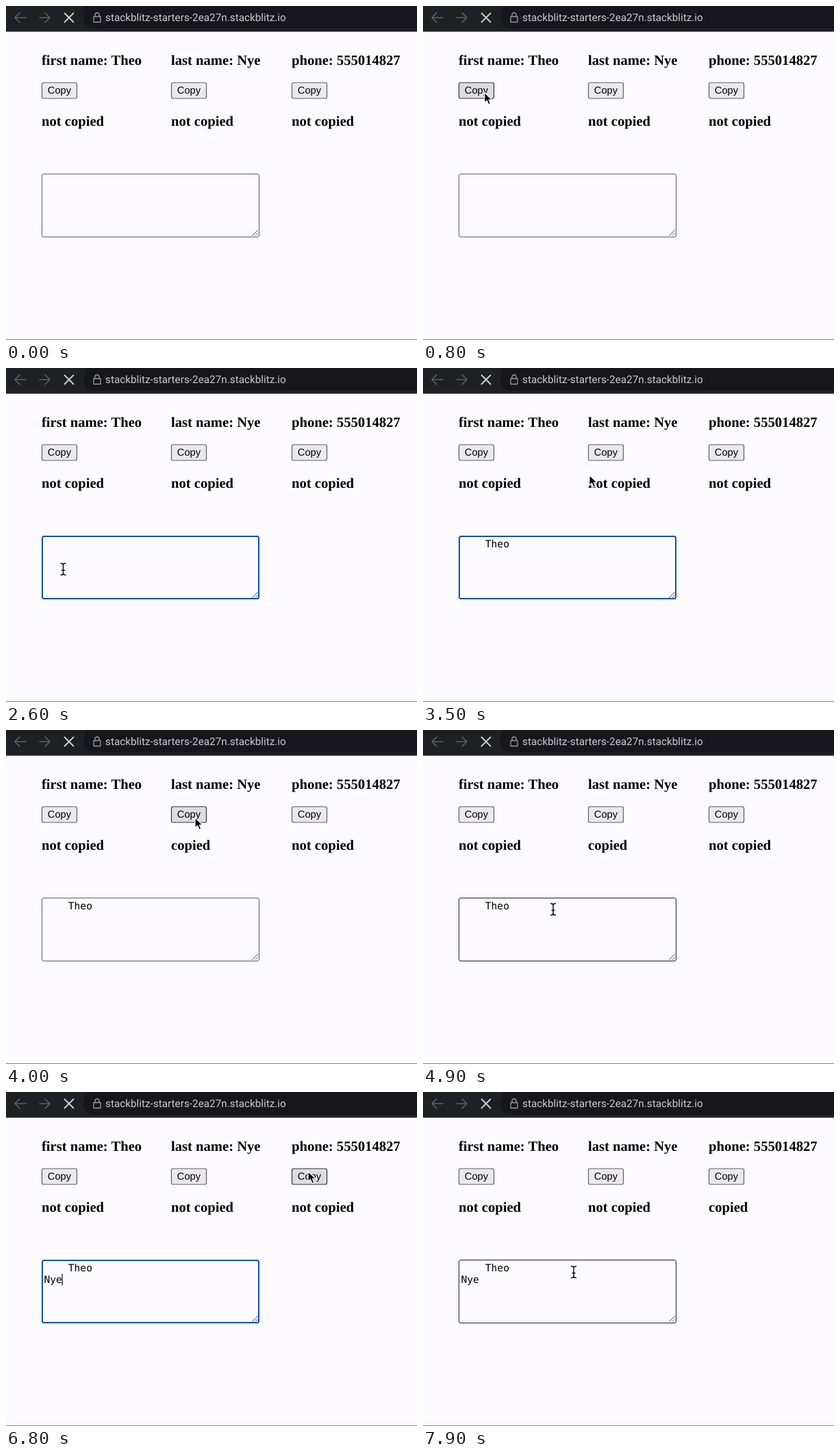
An HTML page for the animation above (8000 ms loop, 600 by 488 pixels).

```html
<!DOCTYPE html>
<html lang="en">
<head>
<meta charset="utf-8">
<title>Copy buttons</title>
<style>
  html, body { margin: 0; width: 100%; height: 100%; overflow: hidden; background: #fdfbff; }
  svg { display: block; }
  text { text-rendering: geometricPrecision; }
  .head { font: bold 20.62px "Liberation Serif", serif; }
  .label { font: 14.67px "Liberation Sans", sans-serif; }
  .mono { font: 14.67px "DejaVu Sans Mono", monospace; }
  .url { font: 15.3px Roboto, sans-serif; fill: #cbc9cf; }
  .line { fill: none; stroke-linecap: round; stroke-linejoin: round; }
  .button rect { fill: #ebe9ee; stroke: #5f5e64; stroke-width: 1.2; }
  .button.hover rect { fill: #dddce1; stroke: #333237; }
  #area { fill: #fdfbff; stroke: #5f5e64; x: 52.5px; y: 245.5px; width: 317px; height: 92px; }
  #area.hover { stroke: #222126; }
  #area.focus { stroke: #0b50b8; stroke-width: 2; x: 53px; y: 246px; width: 316px; height: 91px; }
</style>
</head>
<body>
<svg width="600" height="488" viewBox="0 0 600 488">
  <rect width="600" height="488" fill="#fdfbff"/>
  <rect y="487" width="600" height="1" fill="#858488"/>

  <rect width="600" height="37" fill="#1e2024"/>
  <rect y="37" width="600" height="1" fill="#858488"/>
  <path d="M600 0H117Q113 8 113 16Q113 33 130 33H600Z" fill="#17161c"/>
  <g class="line" stroke="#5e5f64" stroke-width="1.6">
    <path d="M29 17H13M20 10L13 17L20 24"/>
    <path d="M49 17H64M57 10L64 17L57 24"/>
    <path d="M85.5 10.5L98.5 23.5M98.5 10.5L85.5 23.5" stroke="#d2d1d6" stroke-width="1.8"/>
    <path d="M128 15.5H138V23.5H128ZM130 15.5V13a3 3 0 0 1 6 0V15.5" stroke="#98979d" stroke-width="1.3"/>
  </g>
  <text class="url" x="145" y="22">stackblitz-starters-2ea27n.stackblitz.io</text>

  <g id="fields"></g>

  <rect id="area" rx="2.5"/>
  <path class="line" d="M359.5 335.5L367.5 327.5M364 335.5L367.5 332" stroke="#55545a"/>
  <text class="mono" id="first" x="90.7" y="262">Theo</text>
  <text class="mono" id="last" x="55.4" y="279">Nye</text>
  <rect id="caret" width="1.2" height="17" fill="#111"/>

  <path id="arrow" d="M0 0V15L3.5 11.8L6 17.6L8.8 16.4L6.3 10.8H11Z"
        fill="#000" stroke="#fff" stroke-width="1.2" stroke-linejoin="round"/>
  <g id="beam" class="line">
    <path id="stem" d="M-3.5 -8.5Q0 -8.5 0 -6Q0 -8.5 3.5 -8.5M0 -6V6M-3.5 8.5Q0 8.5 0 6Q0 8.5 3.5 8.5M-2 1.5H2"
          stroke="#111" stroke-width="1.5"/>
  </g>
</svg>
<script>
const LOOP = 8000, STEP = 100;
const $ = id => document.getElementById(id);

// x, text, time of the copy
const fields = [
  [52, 'first name: Theo', 1100],
  [241, 'last name: Nye', 4000],
  [417, 'phone: 555014827', 7200]
].map(([x, text, copied]) => {
  const g = document.createElementNS('http://www.w3.org/2000/svg', 'g');
  g.innerHTML = `
    <text class="head" x="${x}" y="86.2">${text}</text>
    <g class="button">
      <rect x="${x + .5}" y="112" width="51" height="23" rx="2.5"/>
      <text class="label" x="${x + 8.8}" y="128.4">Copy</text>
    </g>
    <text class="head status" x="${x}" y="175"></text>`;
  $('fields').append(g);
  return { x, copied, button: g.querySelector('.button'), status: g.querySelector('.status') };
});

// Each leg starts where the one before ended; via bends it
const legs = [
  { start: 200, end: 1000, to: [84, 122] },
  { start: 1400, end: 1800, to: [83.5, 294], via: [92, 208] },
  { start: 3100, end: 4000, to: [276, 128] },
  { start: 4100, end: 4500, to: [181, 243] },
  { start: 4800, end: 4900, to: [190, 262] },
  { start: 6100, end: 6800, to: [441, 116], via: [650, 65] },
  { start: 7700, end: 7900, to: [220, 263] }
];
legs.forEach((leg, i) => {
  leg.from = i ? legs[i - 1].to : [453, 397];
  leg.via ??= leg.from.map((a, k) => (a + leg.to[k]) / 2);
});

// Caret after each edit
const edits = [
  { at: 2100, col: 0, row: 0 },
  { at: 2700, col: 8, row: 0 },
  { at: 5000, col: 8, row: 0 },
  { at: 5500, col: 0, row: 1 },
  { at: 5800, col: 3, row: 1 }
];

const within = (t, from, to) => t >= from && t < to;
const show = (el, on) => el.setAttribute('visibility', on ? 'visible' : 'hidden');
const move = (el, x, y) => el.setAttribute('transform', `translate(${x} ${y})`);
const easeOut = k => 1 - (1 - k) ** 3;

function pointer(t) {
  if (t < 200 || within(t, 5500, 6200)) return null;
  const { start, end, from, via, to } = legs.findLast(leg => t >= leg.start);
  const u = easeOut(Math.min(1, (t - start) / (end - start))), v = 1 - u;
  const [x, y] = from.map((a, k) => v * v * a + 2 * u * v * via[k] + u * u * to[k]);
  return { x, y };
}

function draw(t) {
  const p = pointer(t);
  const over = (x, y, w, h) => !!p && within(p.x, x, x + w) && within(p.y, y, y + h);
  const inArea = over(52, 245, 318, 93);
  const focused = within(t, 2000, 3900) || within(t, 5000, 7100);

  for (const f of fields) {
    f.button.classList.toggle('hover', over(f.x, 112, 52, 24));
    f.status.textContent = within(t, f.copied, f.copied + 1500) ? 'copied' : 'not copied';
  }

  $('area').classList.toggle('hover', inArea);
  $('area').classList.toggle('focus', focused);
  show($('first'), t >= 2700);
  show($('last'), t >= 5800);

  const edit = edits.findLast(e => t >= e.at);
  show($('caret'), focused && edit && (t - edit.at) % 1000 < 500);
  if (edit) move($('caret'), 55 + edit.col * 8.83, 249 + edit.row * 16.5);

  show($('arrow'), p && !inArea);
  show($('beam'), inArea);
  if (p) move($(inArea ? 'beam' : 'arrow'), p.x, p.y);
}

function tick() {
  draw(Math.floor(performance.now() % LOOP / STEP) * STEP);
  requestAnimationFrame(tick);
}
tick();
</script>
</body>
</html>
```
